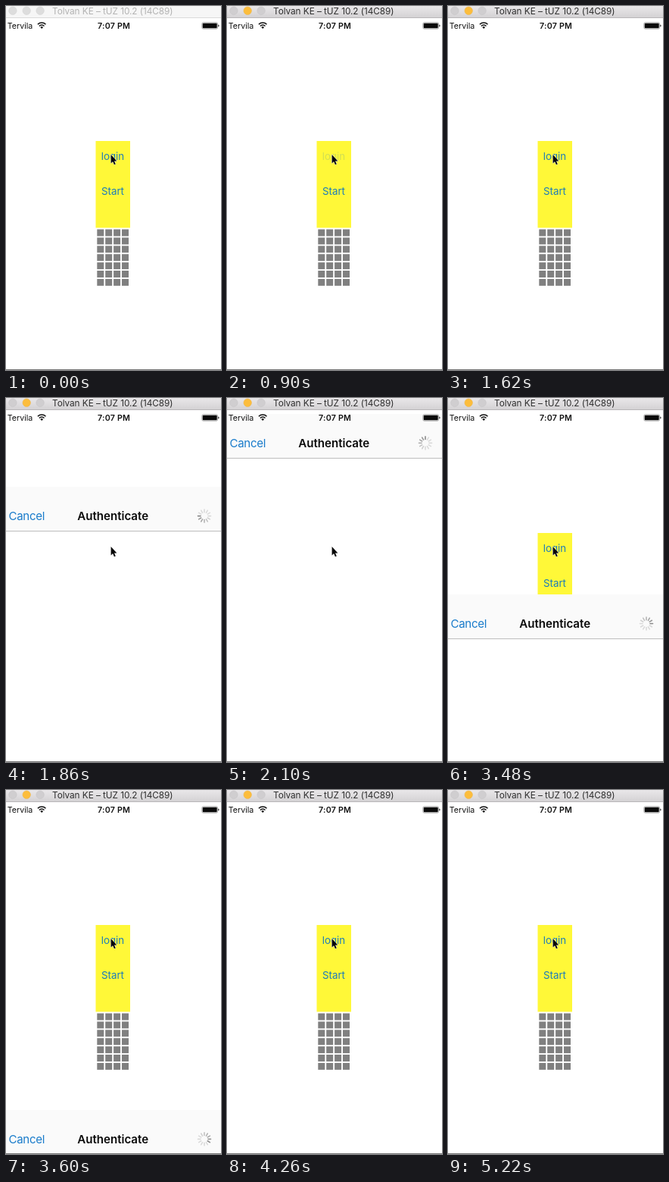
An HTML page that plays this animation: 284x480 px, repeating every 5.28 s.

```html
<!DOCTYPE html>
<html lang="en">
<head>
<meta charset="utf-8">
<title>Login sheet</title>
<style>
  html, body { margin: 0; width: 100%; height: 100%; overflow: hidden; background: #fff; }
  svg { display: block; width: 100vw; height: 100vh; }
  text { font-family: Inter, Roboto, sans-serif; }
  .title { font-size: 11.8px; letter-spacing: -.06px; text-anchor: middle; fill: #2e2e2e; }
  .status { font-size: 10.65px; fill: #111; }
  .clock { font-weight: 600; text-anchor: middle; letter-spacing: .24px; }
  .button { font-size: 13.3px; letter-spacing: -.03px; text-anchor: middle; fill: #1c7cba; }
  .nav { font-size: 15.1px; letter-spacing: -.36px; }
  .heading { font-weight: 600; text-anchor: middle; letter-spacing: -.02px; fill: #0a0a0a; }
  .light { fill: #d0ced0; stroke: #c6c4c6; stroke-width: .6; }
  .minimise { fill: #fcbd3c; stroke: #edb548; }
  .inactive .title { fill: #b2b2b2; }
  .inactive .light { fill: #dddddd; stroke: #d4d4d4; }
  .inactive .chrome { fill: #f6f6f6; }
  .inactive .edge { fill: #dadada; }
</style>
</head>
<body>
<svg viewBox="0 0 284 480">
  <defs>
    <linearGradient id="metal" x2="0" y2="1">
      <stop stop-color="#e9e7e9"/>
      <stop offset="1" stop-color="#d3d1d3"/>
    </linearGradient>
    <clipPath id="screen"><path d="M0 16H284V480H0Z"/></clipPath>
  </defs>
  <rect width="284" height="480" fill="#fff"/>

  <g id="home">
    <rect x="118.5" y="178" width="45.5" height="114.5" fill="#fff838"/>
    <text id="login" class="button" x="141" y="203">login</text>
    <text class="button" x="141" y="248.6">Start</text>
    <g id="cells" fill="#808080"></g>
  </g>

  <g clip-path="url(#screen)">
    <g id="sheet">
      <rect y="16" width="284" height="464" fill="#fff"/>
      <rect y="16" width="284" height="58.5" fill="#fafafa"/>
      <rect y="74" width="284" height="1" fill="#bcbcbc"/>
      <text class="nav" x="3.6" y="60.2" fill="#1a7ccb">Cancel</text>
      <text class="nav heading" x="141.2" y="60.2">Authenticate</text>
      <g id="spinner" transform="translate(262 54.5)" stroke-width="1.6" stroke-linecap="round"></g>
    </g>
  </g>

  <g id="statusBar">
    <text class="status" x="1.8" y="29.6">Tervila</text>
    <g fill="none" stroke="#111" stroke-width="1.5">
      <path d="M41.9 24.2a7.4 7.4 0 0 1 10.6 0M43.9 26.4a4.6 4.6 0 0 1 6.6 0"/>
      <path d="M47.2 30L45.3 28a2.7 2.7 0 0 1 3.8 0Z" fill="#111" stroke="none"/>
    </g>
    <text class="status clock" x="142.6" y="29.6">7:07 PM</text>
    <rect x="258.8" y="21.8" width="20.8" height="8.4" rx="1.8" fill="none" stroke="#777" stroke-width=".6"/>
    <rect x="259.7" y="22.7" width="19" height="6.6" rx="1" fill="#0a0a0a"/>
    <path d="M280.2 24.5q1.4 .2 1.4 1.5t-1.4 1.5Z" fill="#333"/>
  </g>

  <g id="titleBar">
    <rect class="chrome" width="284" height="16" fill="url(#metal)"/>
    <rect class="edge" y="15" width="284" height="1" fill="#b9b7b9"/>
    <circle class="light" cx="8.9" cy="6.2" r="5.2"/>
    <circle class="light minimise" cx="27.2" cy="6.2" r="5.2"/>
    <circle class="light" cx="45.1" cy="6.2" r="5.2"/>
    <text class="title" x="140.8" y="10.8">Tolvan KE – tUZ 10.2 (14C89)</text>
  </g>

  <rect y="479" width="284" height="1" fill="#777"/>
  <path d="M138.6 196V207.4L141.1 205.1L142.9 209.2L144.8 208.4L143 204.4H146.4Z" fill="#080808" stroke="#fff" stroke-width=".9" stroke-linejoin="round" paint-order="stroke"/>
</svg>
<script>
  const LOOP = 5280, TICK = 60, TRAVEL = 464;
  const ACTIVATE = 60, PRESS = 840, RELEASE = 1080, FADE = 480;
  const PRESENT = 1673, DISMISS = 3366, STIFFNESS = 0.0154;
  const SPOKES = 12, SPOKE_TIME = 90, SPIN_START = 1860, SPIN_OFFSET = 9;

  const $ = id => document.getElementById(id);
  const add = (parent, name, attrs) => {
    const node = document.createElementNS("http://www.w3.org/2000/svg", name);
    for (const key in attrs) node.setAttribute(key, attrs[key]);
    return parent.appendChild(node);
  };

  for (let i = 0; i < 28; i++) {
    add($("cells"), "rect", {
      x: 120.3 + i % 4 * 10.9, y: 294.5 + Math.floor(i / 4) * 10.9, width: 9, height: 9
    });
  }

  const spokes = Array.from({ length: SPOKES }, (_, i) =>
    add($("spinner"), "path", { d: "M0 -4.9V-8.5", transform: `rotate(${i * 360 / SPOKES})` }));

  // Critically damped: 1 at rest, settling to 0.
  const spring = ms => {
    const x = Math.max(0, ms) * STIFFNESS;
    return (1 + x) * Math.exp(-x);
  };

  const sheetOffset = t =>
    TRAVEL * (t < DISMISS ? spring(t - PRESENT) : 1 - spring(t - DISMISS));

  const loginOpacity = t =>
    t < PRESS ? 1 : Math.min(1, 0.2 + 0.8 * Math.max(0, t - RELEASE) / FADE);

  function draw(t) {
    $("titleBar").classList.toggle("inactive", t < ACTIVATE);
    $("login").setAttribute("opacity", loginOpacity(t));
    $("sheet").setAttribute("transform", `translate(0 ${sheetOffset(t).toFixed(2)})`);

    const head = Math.round((t - SPIN_START) / SPOKE_TIME) + SPIN_OFFSET;
    spokes.forEach((spoke, i) => {
      const age = ((head - i) % SPOKES + SPOKES) % SPOKES;
      const grey = Math.min(218, 138 + age * 14);
      spoke.setAttribute("stroke", `rgb(${grey},${grey},${grey})`);
    });
  }

  const start = performance.now();
  function frame() {
    const t = (performance.now() - start) % LOOP;
    draw(Math.floor(t / TICK) * TICK);
    requestAnimationFrame(frame);
  }
  frame();
</script>
</body>
</html>
```
